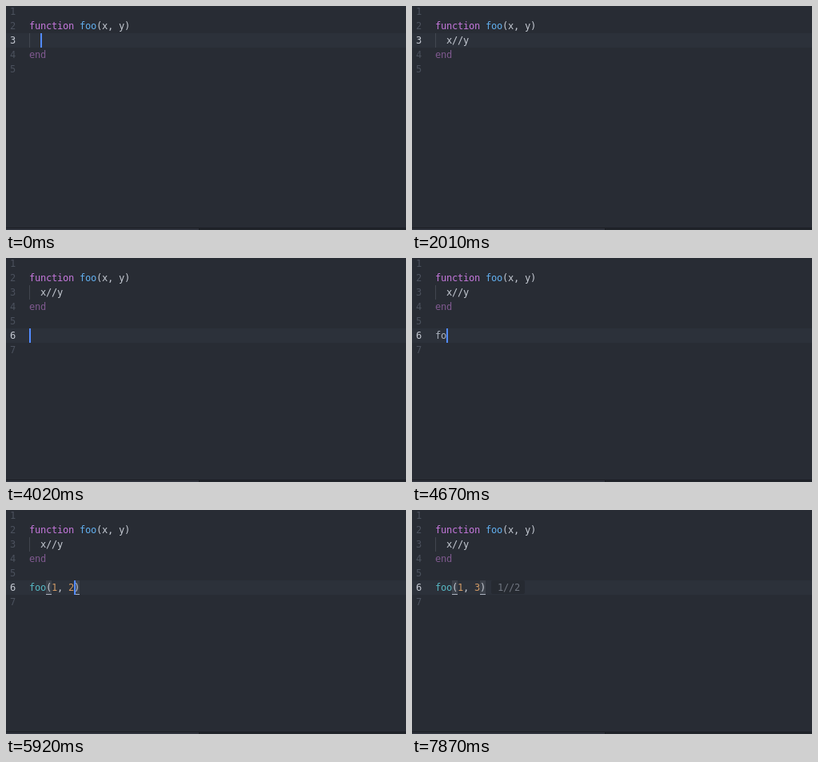
Write an HTML page with a canvas that moves like this. It is 500 px wide and 280 px high and loops after 8 s.

```html
<!DOCTYPE html>
<html lang="en">
<head>
<meta charset="utf-8">
<title>Editor session</title>
<style>
html, body { margin: 0; width: 100%; height: 100%; overflow: hidden; background: #282c34; }
canvas { display: block; width: 500px; height: 280px; }
</style>
</head>
<body>
<canvas id="stage" width="500" height="280"></canvas>
<script>
const ctx = document.getElementById('stage').getContext('2d');
const LOOP = 8000, CELL = 7, ROW = 18, LEFT = 29, ITEM = 24;
const FONT = '12px "DejaVu Sans Mono", "Liberation Mono", monospace';
const C = {
  bg: '#282c34', row: '#2c313a', text: '#abb2bf', bright: '#c5cad3', key: '#c678dd',
  dimKey: '#805a90', fn: '#61afef', call: '#56b6c2', num: '#d19a66',
  gutter: '#4b515d', guide: '#41464f', caret: '#528bff', dark: '#1b1d23'
};

// Each edit: time, caret line, caret column, text of line 3 or of line 6
const edits = [
  { t: 0, line: 3, col: 2, body: '' },
  { t: 530, line: 3, col: 3, body: 'x' },
  { t: 880, line: 3, col: 4, body: 'x/' },
  { t: 940, line: 3, col: 5, body: 'x//' },
  { t: 1420, line: 3, col: 6, body: 'x//y' },
  { t: 3540, line: 4, col: 3 },
  { t: 3900, line: 5, col: 0, lines: 6 },
  { t: 4020, line: 6, col: 0, lines: 7 },
  { t: 4500, col: 1, call: 'f' },
  { t: 4590, col: 2, call: 'fo' },
  { t: 4770, col: 3, call: 'foo' },
  { t: 5150, col: 4, call: 'foo()' },
  { t: 5510, col: 6, call: 'foo(1,)' },
  { t: 5690, col: 7, call: 'foo(1, )' },
  { t: 5920, col: 8, call: 'foo(1, 2)' },
  { t: 7050, col: 7, call: 'foo(1, )' },
  { t: 7390, col: 8, call: 'foo(1, 3)' }
];

const caretOff = [[240, 530], [2010, 2430], [2840, 3200], [6460, 6810], [7870, LOOP]];

const menus = [
  { from: 710, to: 880, line: 3, col: 2, query: 'x', items: ['xcorr', 'xdump'] },
  { from: 1650, to: 2010, line: 3, col: 5, query: 'y', items: ['yield', 'yieldto'] },
  { from: 4680, to: 4850, line: 6, col: 0, query: 'fo', width: 213,
    items: ['foo', 'foldl', 'foldr', 'foreach', 'floor', 'fieldoffset', 'functionloc', 'functionlocs'] },
  { from: 4850, to: 5150, line: 6, col: 0, query: 'foo',
    items: ['foo', 'floor', 'functionloc', 'functionlocs'] }
];

const rowTop = line => 16 + (line - 2) * ROW;
const colX = col => LEFT + col * CELL;
const within = (t, a, b) => t >= a && t < b;
const ramp = (t, a, b) => Math.min(1, Math.max(0, (t - a) / (b - a)));

function rect(x, y, w, h, color) {
  ctx.fillStyle = color;
  ctx.fillRect(x, y, w, h);
}

function write(str, x, base, color, bold) {
  ctx.font = (bold ? 'bold ' : '') + FONT;
  ctx.fillStyle = color;
  [...str].forEach((ch, i) => ctx.fillText(ch, x + i * CELL, base));
}

function code(line, col, str, color) {
  write(str, colX(col), rowTop(line) + 13, color);
}

function stateAt(t) {
  const s = { lines: 5, call: '' };
  for (const e of edits) if (e.t <= t) Object.assign(s, e);
  return s;
}

function drawCall(str) {
  const open = str.indexOf('(');
  if (open < 0) return code(6, 0, str, C.text);
  [...str].forEach((ch, i) => {
    const bracket = ch === '(' || ch === ')';
    if (bracket) {
      rect(colX(i), 88, CELL, ROW, 'rgba(171,178,191,0.12)');
      rect(colX(i), 105, CELL, 1, C.text);
    }
    code(6, i, ch, i < open ? C.call : /\d/.test(ch) ? C.num : C.bright);
  });
}

function drawResult(line, col, str, alpha, stale) {
  if (alpha <= 0) return;
  const x = colX(col + 1), y = rowTop(line), w = 14 + str.length * CELL;
  ctx.save();
  ctx.globalAlpha = alpha;
  ctx.beginPath();
  ctx.roundRect(x, y, w, ROW - 1, 2);
  ctx.fillStyle = '#262a31';
  ctx.fill();
  ctx.globalAlpha = alpha * (1 - 0.45 * stale);
  write(str, x + 8, y + 13, C.text);
  ctx.restore();
}

function drawMenu({ line, col, query, items, width = 202 }) {
  const x = colX(col) - 34, y = rowTop(line) + ROW, h = items.length * ITEM;
  ctx.save();
  ctx.beginPath();
  ctx.roundRect(x, y, width, h, 3);
  ctx.shadowColor = 'rgba(0,0,0,0.3)';
  ctx.shadowBlur = 4;
  ctx.shadowOffsetY = 1;
  ctx.fillStyle = '#272b33';
  ctx.fill();
  ctx.shadowColor = 'transparent';
  ctx.clip();
  rect(x, y, width, ITEM, '#3a3f4b');
  rect(x, y, 25, h, 'rgba(97,175,239,0.22)');
  items.forEach((name, i) => {
    const base = y + i * ITEM + 16;
    write('f', x + 9, base - 1, C.fn, true);
    let hit = 0;
    [...name].forEach((ch, k) => {
      const match = ch === query[hit];
      if (match) hit++;
      write(ch, x + 34 + k * CELL, base, match ? (i ? '#dfe2e8' : '#ffffff') : '#9da5b4', match);
    });
  });
  ctx.restore();
}

function drawFooter() {
  rect(0, 277, 500, 1, C.dark);
  rect(0, 278, 241, 2, '#2f333c');
  rect(241, 278, 259, 2, '#21252b');
  rect(241, 277, 1, 3, C.dark);
}

function draw(t) {
  const s = stateAt(t);
  rect(0, 0, 500, 280, C.bg);
  rect(0, rowTop(s.line), 500, ROW, C.row);

  for (let n = 1; n <= s.lines; n++) {
    write(String(n), 5, rowTop(n) + 13, n === s.line ? C.bright : C.gutter);
  }

  code(2, 0, 'function', C.key);
  code(2, 9, 'foo', C.fn);
  code(2, 12, '(x, y)', C.bright);
  rect(LEFT, rowTop(3), 1, ROW, C.guide);
  code(3, 2, s.body, C.bright);
  code(4, 0, 'end', C.dimKey);
  drawCall(s.call);

  drawResult(4, 3, '> foo', ramp(t, 2400, 2660) - ramp(t, 3160, 3360), 0);
  drawResult(6, s.call.length, '1//2', ramp(t, 6420, 6640), ramp(t, 7030, 7160));

  if (!caretOff.some(([a, b]) => within(t, a, b))) {
    rect(colX(s.col), rowTop(s.line), 2, ROW, C.caret);
  }
  drawFooter();
  menus.filter(m => within(t, m.from, m.to)).forEach(drawMenu);
}

const start = performance.now();
function tick() {
  draw((performance.now() - start) % LOOP);
  requestAnimationFrame(tick);
}
tick();
</script>
</body>
</html>
```
